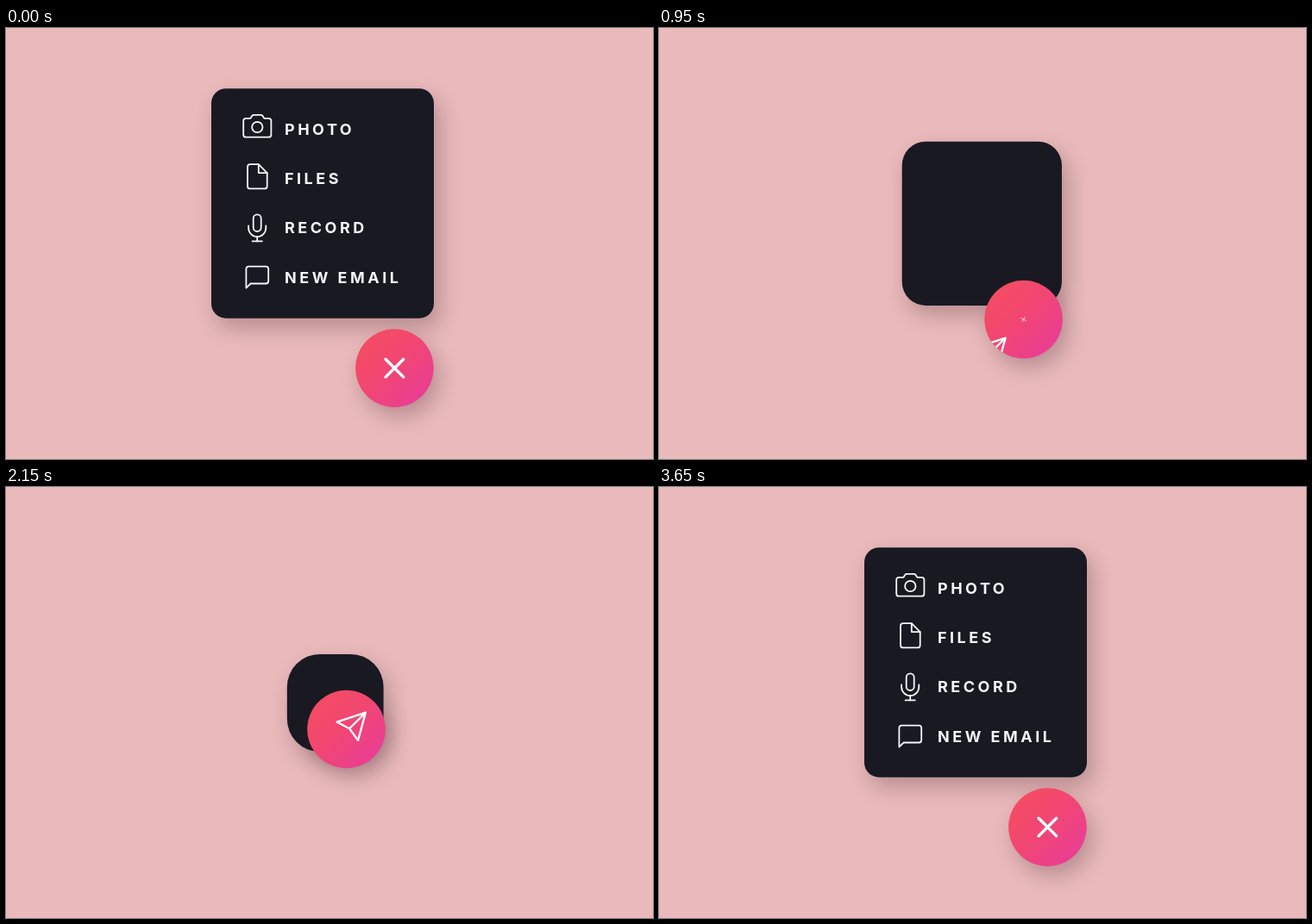
Recreate the animation shown at these times as an HTML page with a canvas. Size 750 px wide and 500 px high, loop 3850 ms.

```html
<!DOCTYPE html>
<html lang="en">
<head>
<meta charset="utf-8">
<title>Action menu</title>
<style>
html, body { margin: 0; width: 100%; height: 100%; overflow: hidden; background: #e9b9bb; }
canvas { display: block; }
svg { position: absolute; }
</style>
</head>
<body>
<canvas id="stage" width="750" height="500"></canvas>
<svg width="0" height="0"><path id="ruler"/></svg>
<script>
const ctx = document.getElementById('stage').getContext('2d');
const ruler = document.getElementById('ruler');
const LOOP = 3850, STEP = 50;

const clamp = u => Math.min(1, Math.max(0, u));
const span = (t, start, length) => clamp((t - start) / length);
const mix = (a, b, u) => a + (b - a) * u;
const easeIn = u => u * u;
const easeOut = u => 1 - (1 - u) * (1 - u);
const easeInOut = u => u < 0.5 ? 2 * u * u : 1 - 2 * (1 - u) * (1 - u);

function measured(d) {
  ruler.setAttribute('d', d);
  return { path: new Path2D(d), length: ruler.getTotalLength() };
}

const items = [
  { label: 'PHOTO', icon: [
    'M292 100.9H287Q286 100.9 285.4 101.8L283.4 104.8H278.2Q275.2 104.8 275.2 107.8V123.7' +
    'Q275.2 126.7 278.2 126.7H304.4Q307.4 126.7 307.4 123.7V107.8Q307.4 104.8 304.4 104.8' +
    'H299.3L297.3 101.8Q296.7 100.9 295.7 100.9Z',
    'M291.3 108.8A6.2 6.2 0 0 0 291.3 121.2A6.2 6.2 0 0 0 291.3 108.8'
  ] },
  { label: 'FILES', icon: [
    'M302.7 182V183.4Q302.7 186.4 299.7 186.4H283Q280 186.4 280 183.4V161.2' +
    'Q280 158.2 283 158.2H292.8L302.7 168.1Z',
    'M292.8 158.2V168.1H302.7'
  ] },
  { label: 'RECORD', icon: [
    'M291.2 216.4A4.5 4.5 0 0 0 286.7 220.9V231.5A4.5 4.5 0 0 0 295.7 231.5V220.9A4.5 4.5 0 0 0 291.2 216.4',
    'M281.1 229.3V232A10.1 10.1 0 0 0 301.3 232V229.3',
    'M291.2 242.1V247.4',
    'M285.6 247.4H296.8'
  ] },
  { label: 'NEW EMAIL', icon: [
    'M278.4 301.6V279.6Q278.4 276.6 281.4 276.6H301.2Q304.2 276.6 304.2 279.6V293.5' +
    'Q304.2 296.5 301.2 296.5H283.6Z'
  ] }
].map(({ label, icon }) => ({ label, icon: icon.map(measured) }));

const plane = new Path2D('M14.8 -12.2L-18.6 -1.3L-4 6.4L6 20Z L14.8 -12.2L-4 6.4');
const cross = new Path2D('M-10.3 -10.3L10.3 10.3M10.3 -10.3L-10.3 10.3');

// 1 = menu open, 0 = collapsed into the button
const openness = t => t < 1600
  ? 1 - easeIn(span(t, 562, 600))
  : easeOut(span(t, 2100, 600));

function withShadow(draw) {
  ctx.save();
  ctx.shadowColor = 'rgba(50, 25, 30, 0.27)';
  ctx.shadowBlur = 25;
  ctx.shadowOffsetX = 6.5;
  ctx.shadowOffsetY = 11;
  draw();
  ctx.restore();
}

function drawPanel(t) {
  const p = openness(t);
  const w = mix(84, 258, p), h = mix(84, 266.5, p);
  const x = mix(384.5, 367, p), y = mix(259.5, 203.4, p);
  withShadow(() => {
    ctx.fillStyle = '#191922';
    ctx.beginPath();
    ctx.roundRect(x - w / 2, y - h / 2, w, h, mix(42, 17, p));
    ctx.fill();
  });
}

function drawIcon(icon, amount) {
  if (amount <= 0) return;
  ctx.lineWidth = 1.8;
  for (const { path, length } of icon) {
    ctx.setLineDash(amount < 1 ? [length * amount, length * 2] : []);
    ctx.stroke(path);
  }
  ctx.setLineDash([]);
}

function drawLabel(label, baseline, rise) {
  if (rise <= 0) return;
  ctx.save();
  ctx.beginPath();
  ctx.rect(310, baseline - 20, 180, 27.5);
  ctx.clip();
  ctx.fillText(label, 323, baseline + mix(20.5, 0, rise));
  ctx.restore();
}

function drawItems(t) {
  const leaving = t < 1600;
  ctx.save();
  ctx.globalAlpha = leaving ? 1 - span(t, 370, 300) : 1;
  ctx.strokeStyle = ctx.fillStyle = '#f6f6f8';
  ctx.font = '700 18px Inter, "Open Sans", sans-serif';
  ctx.letterSpacing = '3.5px';
  items.forEach(({ label, icon }, i) => {
    const drawn = leaving ? 1 : easeInOut(span(t, 2450 + 100 * i, 700));
    const rise = leaving ? 1 : easeInOut(span(t, 2740 + 100 * i, 600));
    drawIcon(icon, drawn);
    drawLabel(label, 123.5 + 57.4 * i, rise);
  });
  ctx.restore();
}

function drawCross(t) {
  const hidden = t < 1600
    ? easeIn(span(t, 550, 450))
    : 1 - easeOut(span(t, 2350, 600));
  if (hidden >= 1) return;
  ctx.save();
  ctx.rotate(-135 * hidden * Math.PI / 180);
  ctx.scale(1 - hidden, 1 - hidden);
  ctx.lineWidth = 3.4;
  ctx.stroke(cross);
  ctx.restore();
}

function drawPlane(t) {
  if (t < 850 || t > 2700) return;
  const shift = t < 1600
    ? -50 * (1 - easeOut(span(t, 850, 600)))
    : 46 * easeOut(span(t, 2100, 600));
  ctx.save();
  ctx.translate(shift * 1.03, -shift * 0.97);
  ctx.lineWidth = 2.3;
  ctx.stroke(plane);
  ctx.restore();
}

function drawButton(t) {
  const p = openness(t);
  ctx.save();
  ctx.translate(mix(383.9, 450.4, p), mix(259.4, 394.6, p));
  ctx.beginPath();
  ctx.arc(0, 0, 45.3, 0, Math.PI * 2);
  const fill = ctx.createLinearGradient(-32, -32, 32, 32);
  fill.addColorStop(0, '#f44c64');
  fill.addColorStop(0.45, '#f14672');
  fill.addColorStop(1, '#ea3e93');
  ctx.fillStyle = fill;
  withShadow(() => ctx.fill());
  ctx.clip();
  ctx.strokeStyle = '#fff';
  drawCross(t);
  drawPlane(t);
  ctx.restore();
}

function render(now) {
  const t = Math.floor((now % LOOP) / STEP) * STEP;
  ctx.fillStyle = '#e9b9bb';
  ctx.fillRect(0, 0, 750, 500);
  ctx.lineCap = ctx.lineJoin = 'round';
  drawPanel(t);
  drawItems(t);
  drawButton(t);
}

const begin = performance.now();
function loop() {
  render(performance.now() - begin);
  requestAnimationFrame(loop);
}
loop();
</script>
</body>
</html>
```
